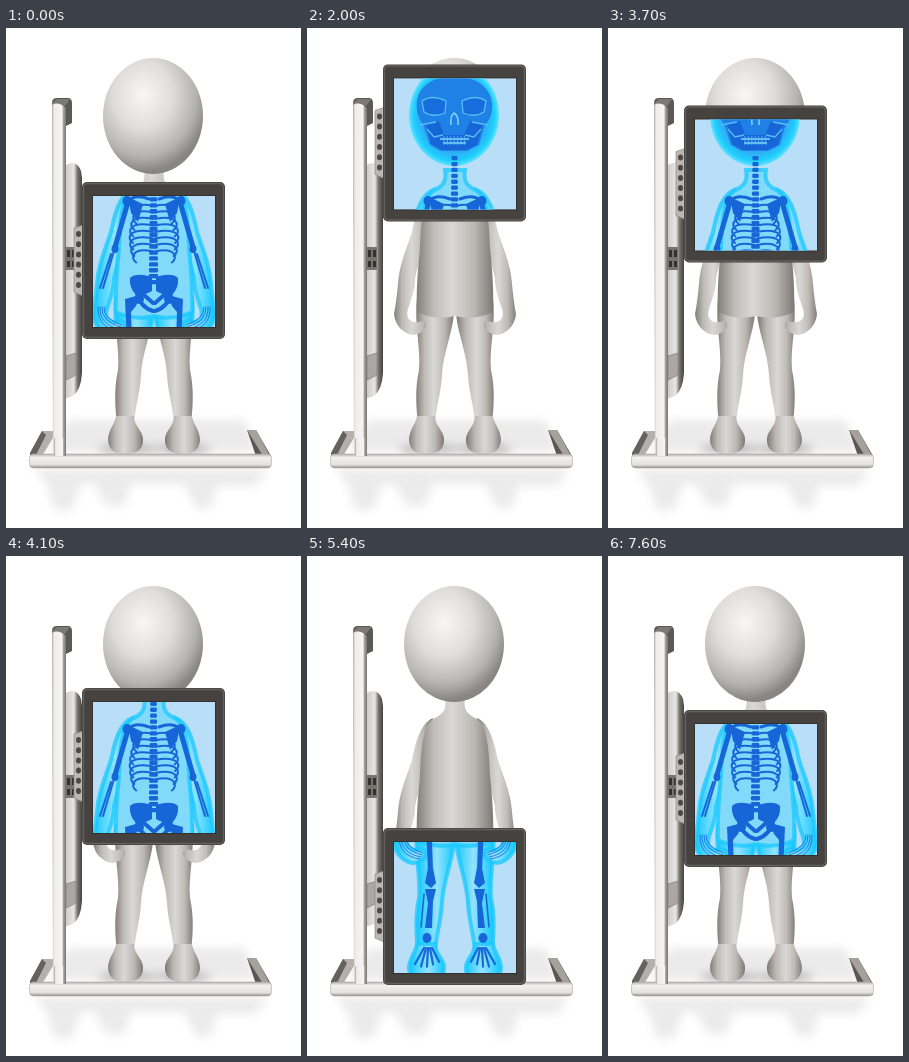
These frames come from a looping animation (295 by 500 pixels, 8.6 s). An HTML page:

```html
<!DOCTYPE html>
<html lang="en">
<head>
<meta charset="utf-8">
<title>X-ray scan</title>
<style>
html, body { margin: 0; width: 100%; height: 100%; overflow: hidden; background: #fff; }
svg { display: block; }
.bone { fill: none; stroke: #1766d8; stroke-linecap: round; stroke-linejoin: round; }
.solid { fill: #1766d8; }
.glow { stroke: #19c9ff; stroke-width: 4; stroke-opacity: .75; }
</style>
</head>
<body>
<svg width="295" height="500" viewBox="0 0 295 500">
<defs>
  <radialGradient id="headFill" cx=".4" cy=".32" r=".66">
    <stop offset="0" stop-color="#f8f7f6"/><stop offset=".45" stop-color="#dfdddb"/>
    <stop offset=".8" stop-color="#b5b3b0"/><stop offset="1" stop-color="#888582"/>
  </radialGradient>
  <linearGradient id="skin">
    <stop offset="0" stop-color="#83807c"/><stop offset=".22" stop-color="#bfbcb8"/>
    <stop offset=".46" stop-color="#dad8d5"/><stop offset=".75" stop-color="#bbb8b4"/>
    <stop offset="1" stop-color="#7d7a76"/>
  </linearGradient>
  <linearGradient id="post">
    <stop offset="0" stop-color="#aaa7a5"/><stop offset=".14" stop-color="#edecea"/>
    <stop offset=".72" stop-color="#f6f5f4"/><stop offset=".8" stop-color="#aaa7a4"/>
    <stop offset="1" stop-color="#77736f"/>
  </linearGradient>
  <linearGradient id="panel">
    <stop offset="0" stop-color="#c9c7c4"/><stop offset=".55" stop-color="#e7e6e4"/>
    <stop offset=".75" stop-color="#777470"/><stop offset="1" stop-color="#45423f"/>
  </linearGradient>
  <linearGradient id="bar" x2="0" y2="1">
    <stop offset="0" stop-color="#b5b2af"/><stop offset=".25" stop-color="#f2f1f0"/>
    <stop offset=".75" stop-color="#e4e2e0"/><stop offset="1" stop-color="#96938f"/>
  </linearGradient>
  <radialGradient id="xHead">
    <stop offset="0" stop-color="#2b93ee"/><stop offset=".72" stop-color="#2faaf3"/>
    <stop offset=".9" stop-color="#20cfff"/><stop offset="1" stop-color="#62e2ff"/>
  </radialGradient>
  <linearGradient id="xLimb">
    <stop offset="0" stop-color="#12c6ff"/><stop offset=".3" stop-color="#5ad8ff"/>
    <stop offset=".55" stop-color="#93e2fd"/><stop offset="1" stop-color="#18caff"/>
  </linearGradient>
  <filter id="soft" x="-30%" y="-50%" width="160%" height="200%"><feGaussianBlur stdDeviation="5"/></filter>
  <path id="arm" d="M126 162C114 167 109 184 105 204C99 222 92 238 91 256C90 266 89 276 87 286C88 298 97 306 106 307C114 306 120 301 119 296C117 291 112 295 107 294C101 293 99 288 101 281C104 272 108 262 108 250C112 234 117 218 120 198Z"/>
  <path id="torso" d="M138 142C140 154 136 158 126 163C115 172 114 196 113 220C111 240 109 262 110 284Q129 293 148 288Q167 293 186 284C187 262 185 240 183 220C182 196 181 172 170 163C160 158 156 154 158 142Z"/>
  <path id="leg" d="M110 270C107 296 114 320 112 342C108 360 109 378 111 396L128 396C129 378 134 366 135 347C136 326 145 306 147 286Z"/>
  <path id="foot" d="M110 388C109 396 102 402 102 412C103 424 111 426 120 426C131 426 138 421 137 410C136 402 128 398 128 388Z"/>
  <clipPath id="view"><rect id="viewRect" x="87" width="122" height="131"/></clipPath>
</defs>

<!-- floor -->
<g filter="url(#soft)">
  <path d="M62 392H238L252 424H40Z" fill="#d8d8d8" opacity=".5"/>
  <path d="M28 441H262L250 458H210L205 480H190L178 456H125L118 478H100L88 456H75L66 482H48L42 458Z" fill="#d0d0d0" opacity=".42"/>
  <ellipse cx="122" cy="421" rx="30" ry="5" fill="#777" opacity=".5"/>
  <ellipse cx="177" cy="421" rx="28" ry="5" fill="#777" opacity=".5"/>
</g>

<!-- stand, rear -->
<path d="M58 138Q70 130 75 143L76 150V345Q75 362 67 368L58 371Z" fill="url(#panel)"/>
<path d="M60 328L70 325V347L60 352Z" fill="#aaa7a4" stroke="#807d79" stroke-width=".7"/>
<path d="M241 402H250L265 428V434H252Z" fill="#5a5753"/>
<path d="M241 402H250L264 428H257Z" fill="#a5a29e"/>

<g id="man"></g>

<!-- stand, front -->
<path d="M46 75Q46 70 51 70H63Q66 71 66 75V95L60 98V85H46Z" fill="#5c5855"/>
<path d="M46 75L51 71H64L59 78H46Z" fill="#7d7976"/>
<path d="M46 77Q52 73 60 80V430H47Z" fill="url(#post)"/>
<path d="M36 403H47V410L36 428H24V425Z" fill="#b3b0ad"/>
<path d="M36 403L40 407L30 427H24V425Z" fill="#65615e"/>
<rect x="23.500" y="426" width="242" height="14" rx="4" fill="url(#bar)" stroke="#aaa7a4" stroke-width=".6"/>
<path d="M48 410H60V428H48Z" fill="url(#post)"/>
<rect x="59" y="219" width="11" height="23" rx="1" fill="#777470"/>
<path d="M61 222H64V229H61ZM66 222H69V229H66ZM61 233H64V239H61ZM66 233H69V239H66Z" fill="#34312f"/>

<!-- moving screen -->
<g id="screen">
  <path d="M68 46L77 43V114L68 110Z" fill="#bab7b4" stroke="#8d8a87" stroke-width=".7"/>
  <g id="buttons" fill="#4b4845"></g>
  <rect x="76" y="0" width="143" height="157" rx="5" fill="#454240"/>
  <rect x="77.500" y="1.500" width="140" height="154" rx="4" fill="none" stroke="#62605d" stroke-width="1.500"/>
  <rect x="86" y="13" width="124" height="133" fill="#343230"/>
  <rect x="87" y="14" width="122" height="131" fill="#b9def8"/>
</g>
<g clip-path="url(#view)"><g id="xray"></g></g>
</svg>

<script>
const $ = id => document.getElementById(id);
const both = s => s + `<g transform="translate(296 0) scale(-1 1)">${s}</g>`;
const part = (id, attrs) => `<use href="#${id}" ${attrs}/>`;
const bone = (d, w) => `<path class="bone" d="${d}" stroke-width="${w}"/>`;
const solid = d => `<path class="solid" d="${d}"/>`;
const oval = (x, y, rx, ry, attrs = 'class="solid"') =>
  `<ellipse cx="${x}" cy="${y}" rx="${rx}" ry="${ry}" ${attrs}/>`;
const repeat = (n, draw) => Array.from({ length: n }, (_, i) => draw(i)).join('');

const skin = 'fill="url(#skin)"';
$('man').innerHTML =
  both(part('leg', skin) + part('foot', skin) + part('arm', skin)) +
  part('torso', skin) + oval(147, 88, 50, 58, 'fill="url(#headFill)"');

$('buttons').innerHTML = repeat(6, i => oval(72.5, 52 + i * 10.2, 2.5, 3, ''));

function skeleton() {
  const ribs = repeat(8, i => {
    const y = 178 + i * 6.5, w = 15 + 8 * Math.sin((i + 1) / 3.2);
    return bone(`M147 ${y}C${147 - w} ${y - 5} ${147 - w * 1.2} ${y + 6} ${150 - w} ${y + 11}`, 2);
  });
  const toes = repeat(5, i =>
    bone(`M${117 + i * 2} 392L${108 + i * 6} ${408 + 3 * Math.sin(i)}`, 2.2));
  const fingers = repeat(4, i =>
    bone(`M${92 + i * 2} 279Q${91 + i * 2} ${300 - i * 3} ${113 + i} ${303 - i * 2}`, .8));
  const spine = repeat(22, i =>
    `<rect class="solid" x="${144.5 - i / 12}" y="${128 + i * 5.9}" width="${6 + i / 6}" height="4.300" rx="1.300"/>`);
  const side =
    bone('M143 171Q130 166 123 172', 3) +
    solid('M122 169L137 176L132 194L125 185Z') +
    bone('M122 174L109 219', 5) + oval(121, 173, 4.5, 5) + oval(109, 221, 3.5, 4) +
    bone('M108 223L97 260M105 226L94 260', 2) + fingers +
    solid('M146 249Q130 244 124 250Q123 260 130 267Q138 268 146 263Z') +
    bone('M131 265Q134 279 147 283M138 267L147 275', 4) +
    oval(133, 271, 5, 5) + solid('M119 271L134 267L130 278L125 284L126 315H121Z') +
    solid('M121 312H126L129 327L124 332L118 327Z') +
    solid('M118 333H129L126 345L125 372H118L121 347Z') +
    bone('M117 338L114 371', 1.6) + oval(120, 382, 4.5, 5) + toes;
  return both(ribs + side) + spine;
}

function skull() {
  const socket = 'M116 73Q126 66 140 73L139 85Q127 90 118 84Z';
  return `<path d="M147 49C120 48 107 64 110 82C111 92 117 95 118 102L123 117L134 123H160L172 117L176 102C178 95 184 92 185 82C187 64 174 48 147 49Z" fill="#1f80e5"/>` +
    `<path d="M119 96L132 93L137 107H157L163 93L176 96L170 117L159 122H135L124 116Z" class="solid"/>` +
    `<g transform="translate(-1 0)" fill="#166ddb" stroke="#55bdf8" stroke-width="1.300">${both(`<path d="${socket}"/><path d="M114 97L130 94M121 101L128 109L137 107" fill="none"/>`)}</g>` +
    `<path d="M144 97Q143 88 147 85Q152 88 151 97M133 111H162M136 115H159" fill="none" stroke="#85d5fb" stroke-width="1.500"/>` +
    repeat(7, i => `<path d="M${137 + i * 3.4} 108V117" stroke="#5cc2fa" stroke-width=".8"/>`);
}

const limb = 'fill="url(#xLimb)" class="glow"';
$('xray').innerHTML =
  both(part('leg', limb) + part('foot', limb) + part('arm', limb)) +
  part('torso', 'fill="#82dafb" class="glow"') +
  oval(147, 87, 45, 51, 'fill="url(#xHead)"') + skeleton() + skull();

// [time, top of screen]
const keys = [[0, 154], [900, 154], [1400, 100], [1800, 46], [2300, 22], [3200, 22], [3300, 23],
  [4100, 132], [5000, 223], [5400, 272], [6300, 272], [6800, 226], [7600, 154], [8600, 154]];

function topAt(t) {
  const i = keys.findIndex(k => k[0] > t);
  const [t0, y0] = keys[i - 1], [t1, y1] = keys[i];
  return y0 + (y1 - y0) * (t - t0) / (t1 - t0);
}

const start = performance.now();
function draw() {
  const t = Math.max(0, performance.now() - start) % 8600;
  const y = topAt(Math.floor(t / 100) * 100);
  $('screen').setAttribute('transform', `translate(0 ${y})`);
  $('viewRect').setAttribute('y', y + 14);
  requestAnimationFrame(draw);
}
draw();
</script>
</body>
</html>
```
